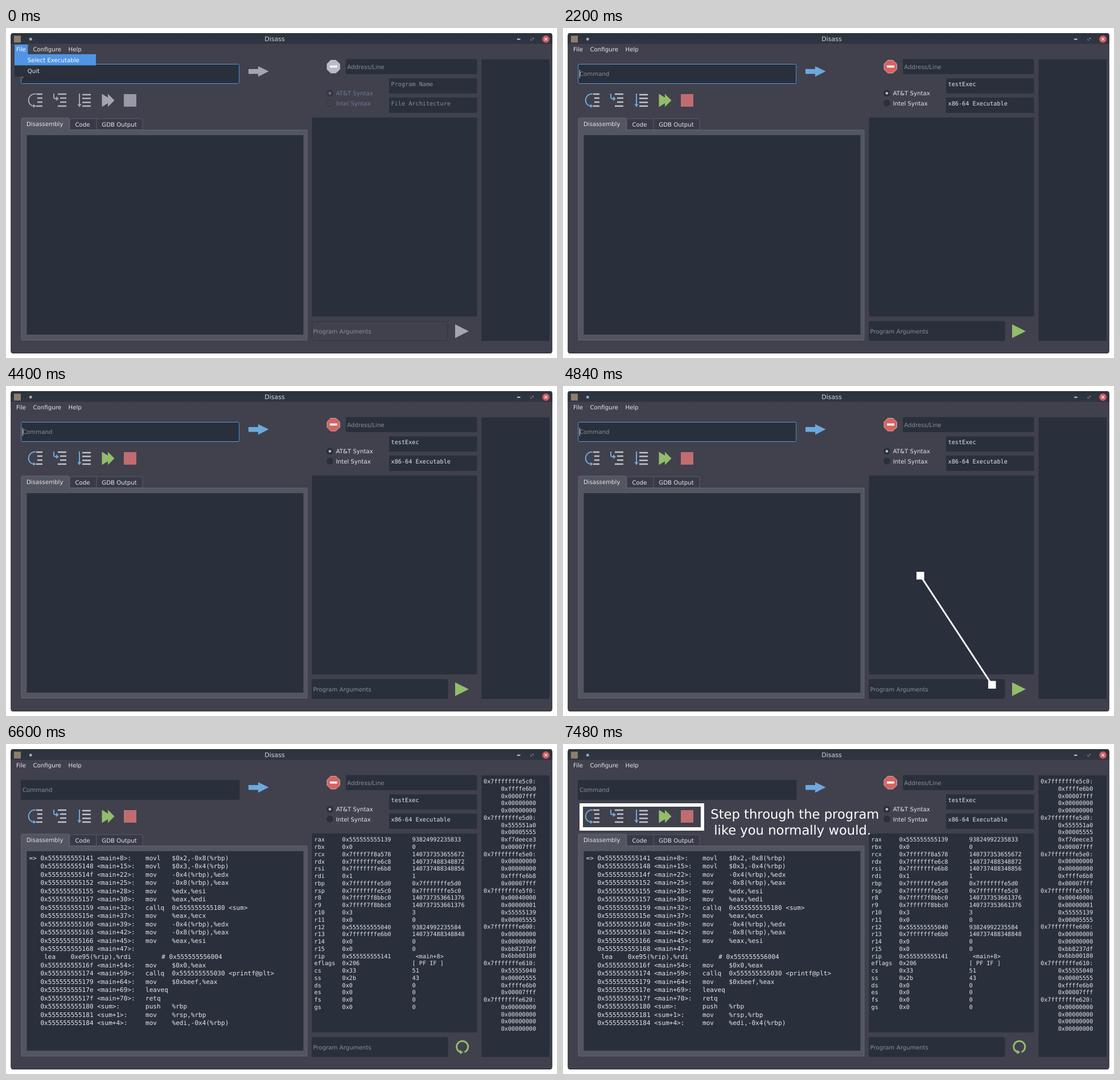
Animation of 968x579 px, one loop 8.8 s. Source, as an HTML page:

```html
<!DOCTYPE html>
<html lang="en">
<head>
<meta charset="utf-8">
<title>Disass</title>
<style>
  html, body { margin: 0; width: 100%; height: 100%; overflow: hidden; background: #fff; }
  svg { display: block; width: 968px; height: 579px; animation: theme 8.8s step-end infinite; }
  text { font: 10.21px "DejaVu Sans", sans-serif; fill: #e4e6e9; white-space: pre; text-rendering: geometricPrecision; }
  .title { font-size: 11.06px; fill: #cfd3da; }
  .mono { font-family: "DejaVu Sans Mono", monospace; }
  .code { font-size: 11.06px; }
  .hint { fill: #8b8f96; }
  .field { fill: #29303b; }
  .note { font-size: 34.67px; fill: #fff; }
  .small { font-size: 22.67px; }
  .mark { stroke: #fff; stroke-width: 3; fill: #fff; }
  .mark rect { stroke: none; }
  .blue { fill: var(--blue); }
  .line { fill: none; stroke: var(--blue); stroke-width: 2; }
  .green { fill: var(--green); }
  .red { fill: var(--red); }
  .stop { fill: var(--stop); }
  .radio { fill: var(--radio); }
  .bars { fill: none; stroke: var(--bars); stroke-width: 2.4; }

  /* The story runs in 20 beats of 440 ms, 5% each. */
  .show { animation: 8.8s step-end infinite; }
  .setup { animation-name: setup; }
  .loaded { animation-name: loaded; }
  .idle { animation-name: idle; }
  .running { animation-name: running; }
  .mark1 { animation-name: mark1; }
  .note1 { animation-name: note1; }
  .mark2 { animation-name: mark2; }
  .note2 { animation-name: note2; }
  .mark3 { animation-name: mark3; }
  .note3 { animation-name: note3; }
  .mark4 { animation-name: mark4; }
  .note4 { animation-name: note4; }
  @keyframes theme {
    0% { --blue: #a5a5b1; --green: #a5a5b1; --red: #b9bac4; --stop: #9898a6; --radio: #707990; --bars: #b4b5bf; }
    25%, 100% { --blue: #6ca9dc; --green: #93bd6b; --red: #d9625f; --stop: #bf6d70; --radio: #e4e6e9; --bars: #c2c4c9; }
  }
  @keyframes setup { 0% { opacity: 1 } 25%, 100% { opacity: 0 } }
  @keyframes loaded { 0% { opacity: 0 } 25%, 100% { opacity: 1 } }
  @keyframes idle { 0% { opacity: 1 } 75%, 100% { opacity: 0 } }
  @keyframes running { 0% { opacity: 0 } 75%, 100% { opacity: 1 } }
  @keyframes mark1 { 0% { opacity: 0 } 5% { opacity: 1 } 25%, 100% { opacity: 0 } }
  @keyframes note1 { 0% { opacity: 0 } 10% { opacity: 1 } 25%, 100% { opacity: 0 } }
  @keyframes mark2 { 0% { opacity: 0 } 30% { opacity: 1 } 50%, 100% { opacity: 0 } }
  @keyframes note2 { 0% { opacity: 0 } 35% { opacity: 1 } 50%, 100% { opacity: 0 } }
  @keyframes mark3 { 0% { opacity: 0 } 55% { opacity: 1 } 75%, 100% { opacity: 0 } }
  @keyframes note3 { 0% { opacity: 0 } 60% { opacity: 1 } 75%, 100% { opacity: 0 } }
  @keyframes mark4 { 0% { opacity: 0 } 80%, 100% { opacity: 1 } }
  @keyframes note4 { 0% { opacity: 0 } 85%, 100% { opacity: 1 } }
</style>
</head>
<body>
<svg viewBox="0 0 968 579">
  <defs>
    <linearGradient id="bar" x2="0" y2="1">
      <stop offset="0" stop-color="#2b333e"/><stop offset="1" stop-color="#303641"/>
    </linearGradient>
  </defs>

  <!-- window -->
  <rect x="8.5" y="9" width="951" height="562" rx="4" fill="#40414d"/>
  <path d="M8.5 28V13a4 4 0 0 1 4-4H955.5a4 4 0 0 1 4 4V28Z" fill="url(#bar)"/>
  <rect x="9" y="9.5" width="950" height="561" rx="4" fill="none" stroke="#2b313c"/>
  <rect x="14" y="13.500" width="12" height="12" fill="#8d7f6d"/>
  <circle cx="43.300" cy="19.500" r="2.500" fill="#a4a8ae"/>
  <text class="title" x="472" y="22.500" text-anchor="middle">Disass</text>
  <rect x="898" y="18.700" width="5.500" height="2" fill="#c8ccd3"/>
  <path d="M923.500 17H927V20.500ZM921.500 18.500V22H925Z" fill="#777d88"/>
  <circle cx="948.500" cy="19.500" r="6.500" fill="#cc575d"/>
  <path d="M946 17l5 5m0-5l-5 5" stroke="#f0e4e6" stroke-width="1.400"/>

  <!-- left column -->
  <rect class="field" x="26" y="63" width="384.500" height="35" rx="2.500"/>
  <text class="hint" x="29" y="84">Command</text>
  <g class="show idle">
    <rect x="26.700" y="63.500" width="383" height="34" rx="2" fill="none" stroke="#5b9bdc"/>
    <path d="M29.300 73.500V87.500" stroke="#e4e6e9"/>
  </g>
  <path class="blue" d="M426 72H443V67L461.500 76 443 85.500V80.500H426Z"/>

  <path class="line" d="M52 115.500C36 115.500 36 137 50 137"/>
  <path class="blue" d="M48 133.500L53 137 48 140Z"/>
  <path class="bars" d="M53 116H64M55 123H64M55 130H64M53 137H64"/>
  <path class="line" d="M84 115V121Q84 124 87 124H89"/>
  <path class="blue" d="M88 120L93 124 88 128Z"/>
  <path class="bars" d="M91 116H106M95 123H106M95 130H106M91 137H106"/>
  <path class="line" d="M129 115V134"/>
  <path class="blue" d="M125.500 133.500H132.500L129 139Z"/>
  <path class="bars" d="M134 117H149M134 123.500H149M134 130.500H149M134 137H149"/>
  <path class="green" d="M168.500 115.500L179 122V115.500L190.500 127 179 138.500V132L168.500 138.500Z"/>
  <rect class="stop" x="207" y="116" width="22" height="22"/>

  <rect x="27" y="179" width="502" height="368.500" rx="1" fill="#535560" stroke="#666873"/>
  <path d="M112 178.500V161a2 2 0 0 1 2-2H238a2 2 0 0 1 2 2V178.500ZM159 159V178.500" fill="#383b47" stroke="#5b5d68"/>
  <path d="M27 180V160a2 2 0 0 1 2-2H109a2 2 0 0 1 2 2V180" fill="#535560"/>
  <path d="M27 180V160a2 2 0 0 1 2-2H109a2 2 0 0 1 2 2V179" fill="none" stroke="#666873"/>
  <text x="36" y="172.300">Disassembly</text>
  <text x="121.500" y="172.500">Code</text>
  <text x="168.300" y="172.500">GDB Output</text>
  <rect class="field" x="36.500" y="188" width="486" height="350"/>

  <!-- right columns -->
  <path class="red" d="M570.500 56.500H579.500L586.500 63V72.500L579.500 79H570.500L564 72.500V63Z" stroke="#d2c8cd" stroke-width=".8"/>
  <rect x="569" y="65.700" width="13" height="3.800" fill="#f2f2f4"/>
  <rect class="field" x="597" y="54.500" width="230.500" height="26.500" rx="2"/>
  <text class="hint" x="599.300" y="71.500">Address/Line</text>
  <circle class="field" cx="569" cy="114.500" r="6"/>
  <circle class="radio" cx="569" cy="114.500" r="2.300" opacity=".8"/>
  <circle class="field" cx="569" cy="131.700" r="6"/>
  <g class="show setup" fill="#40414d" stroke="#363b47">
    <circle cx="569" cy="114.500" r="5.500" fill="#343944"/>
    <circle cx="569" cy="114.500" r="2.300" fill="#687084" stroke="none"/>
    <circle cx="569" cy="131.700" r="5.500"/>
  </g>
  <text class="radio" x="579.700" y="118.200">AT&amp;T Syntax</text>
  <text class="radio" x="579.700" y="135.500">Intel Syntax</text>
  <rect class="field" x="673" y="88.500" width="154.500" height="26.500"/>
  <rect class="field" x="673" y="122" width="154.500" height="27"/>
  <g class="show setup">
    <text class="mono hint" x="676.500" y="102.200">Program Name</text>
    <text class="mono hint" x="676.500" y="136.200">File Architecture</text>
  </g>
  <g class="show loaded">
    <text class="mono" x="676.500" y="102.200">testExec</text>
    <text class="mono" x="676.500" y="136.200">x86-64 Executable</text>
  </g>
  <rect class="field" x="537.500" y="157" width="290" height="349"/>
  <rect class="field" x="835.500" y="55" width="119.500" height="494"/>
  <rect x="537.500" y="515" width="238.500" height="33.500" rx="3" fill="none" stroke="#2e343f"/>
  <rect class="field show loaded" x="537" y="514.500" width="239.500" height="34.500" rx="3"/>
  <text class="hint" x="539.500" y="535.500">Program Arguments</text>
  <path class="green show idle" d="M789 520L813 532 789 544Z"/>

  <g class="show running">
    <path d="M805.500 540.500A10 10 0 1 0 798 540.500" fill="none" stroke="#93bd6b" stroke-width="3"/>
    <path d="M797 536.500L803.500 541 797.500 544Z" fill="#93bd6b"/>
    <g id="listing"></g>
    <g id="registers"></g>
    <g id="stack"></g>
  </g>

  <!-- menu -->
  <text x="18" y="40.700">File</text>
  <text x="47.500" y="40.700">Configure</text>
  <text x="109.500" y="40.700">Help</text>
  <g class="show setup">
    <rect x="15" y="46" width="143" height="39.500" fill="#2a313c"/>
    <path d="M15 29H38.500V46H158V65.500H15Z" fill="#5095e3"/>
    <text x="18" y="40.700" style="fill:#fff">File</text>
    <text x="37.700" y="59.500" style="fill:#fff">Select Executable</text>
    <text x="37.700" y="79.200">Quit</text>
  </g>

  <!-- guide notes -->
  <g class="mark show mark1"><path d="M147 56L410 261"/><rect x="140" y="49" width="14" height="14"/><rect x="403" y="254" width="14" height="14"/></g>
  <g class="show note1">
    <text class="note" x="427" y="265.400">Open a new file</text>
    <text class="note" x="399" y="306.400">from the File menu</text>
  </g>
  <g class="mark show mark2"><path d="M687 67L496 191"/><rect x="680" y="60" width="14" height="14"/><rect x="489" y="184" width="14" height="14"/></g>
  <text class="note show note2" x="276.700" y="234.600">Set a breakpoint</text>
  <g class="mark show mark3"><path d="M628 333L753.500 524"/><rect x="621" y="326" width="13.500" height="13.500"/><rect x="747" y="517.500" width="13.500" height="13.500"/></g>
  <g class="show note3" text-anchor="middle">
    <text class="note" x="488.300" y="305.600">Run the program,</text>
    <text class="note" x="488.300" y="346.600">and add any</text>
    <text class="note" x="488.300" y="387.600">needed arguments.</text>
  </g>
  <rect class="show mark4" x="32" y="107" width="213" height="42" fill="none" stroke="#fff" stroke-width="6"/>
  <g class="show note4">
    <text class="note small" x="259.300" y="131.300">Step through the program</text>
    <text class="note small" x="265.300" y="159.300">like you normally would.</text>
  </g>
</svg>
<script>
  const listing = `=> 0x555555555141 <main+8>:|movl   $0x2,-0x8(%rbp)
   0x555555555148 <main+15>:|movl   $0x3,-0x4(%rbp)
   0x55555555514f <main+22>:|mov    -0x4(%rbp),%edx
   0x555555555152 <main+25>:|mov    -0x8(%rbp),%eax
   0x555555555155 <main+28>:|mov    %edx,%esi
   0x555555555157 <main+30>:|mov    %eax,%edi
   0x555555555159 <main+32>:|callq  0x555555555180 <sum>
   0x55555555515e <main+37>:|mov    %eax,%ecx
   0x555555555160 <main+39>:|mov    -0x4(%rbp),%edx
   0x555555555163 <main+42>:|mov    -0x8(%rbp),%eax
   0x555555555166 <main+45>:|mov    %eax,%esi
   0x555555555168 <main+47>:
    lea    0xe95(%rip),%rdi        # 0x555555556004
   0x55555555516f <main+54>:|mov    $0x0,%eax
   0x555555555174 <main+59>:|callq  0x555555555030 <printf@plt>
   0x555555555179 <main+64>:|mov    $0xbeef,%eax
   0x55555555517e <main+69>:|leaveq
   0x55555555517f <main+70>:|retq
   0x555555555180 <sum>:|push   %rbp
   0x555555555181 <sum+1>:|mov    %rsp,%rbp
   0x555555555184 <sum+4>:|mov    %edi,-0x4(%rbp)`;

  const registers = `rax|0x555555555139|93824992235833
rbx|0x0|0
rcx|0x7ffff7f8a578|140737353655672
rdx|0x7fffffffe6c8|140737488348872
rsi|0x7fffffffe6b8|140737488348856
rdi|0x1|1
rbp|0x7fffffffe5d0|0x7fffffffe5d0
rsp|0x7fffffffe5c0|0x7fffffffe5c0
r8|0x7ffff7f8bbc0|140737353661376
r9|0x7ffff7f8bbc0|140737353661376
r10|0x3|3
r11|0x0|0
r12|0x555555555040|93824992235584
r13|0x7fffffffe6b0|140737488348848
r14|0x0|0
r15|0x0|0
rip|0x555555555141| <main+8>
eflags|0x206|[ PF IF ]
cs|0x33|51
ss|0x2b|43
ds|0x0|0
es|0x0|0
fs|0x0|0
gs|0x0|0`;

  const stack = `0x7fffffffe5c0:
|0xffffe6b0
|0x00007fff
|0x00000000
|0x00000000
0x7fffffffe5d0:
|0x555551a0
|0x00005555
|0xf7deece3
|0x00007fff
0x7fffffffe5e0:
|0x00000000
|0x00000000
|0xffffe6b8
|0x00007fff
0x7fffffffe5f0:
|0x00040000
|0x00000001
|0x55555139
|0x00005555
0x7fffffffe600:
|0x00000000
|0x00000000
|0xbb8237df
|0x6bb00180
0x7fffffffe610:
|0x55555040
|0x00005555
|0xffffe6b0
|0x00007fff
0x7fffffffe620:
|0x00000000
|0x00000000
|0x00000000
|0x00000000`;

  // Writes lines of "|"-separated cells at the given column positions.
  function fill(id, source, columns, top, step, style = "mono") {
    const group = document.getElementById(id);
    source.split("\n").forEach((row, i) => row.split("|").forEach((cell, j) => {
      if (!cell) return;
      const text = document.createElementNS(group.namespaceURI, "text");
      text.setAttribute("class", style);
      text.setAttribute("x", columns[j]);
      text.setAttribute("y", top + i * step);
      text.textContent = cell;
      group.append(text);
    }));
  }

  fill("listing", listing, [40.5, 245], 203.8, 14.47, "mono code");
  fill("registers", registers, [541.5, 590.5, 713.5], 171.3, 12.77);
  fill("stack", stack, [839, 869.7], 69, 12.77);
</script>
</body>
</html>
```
